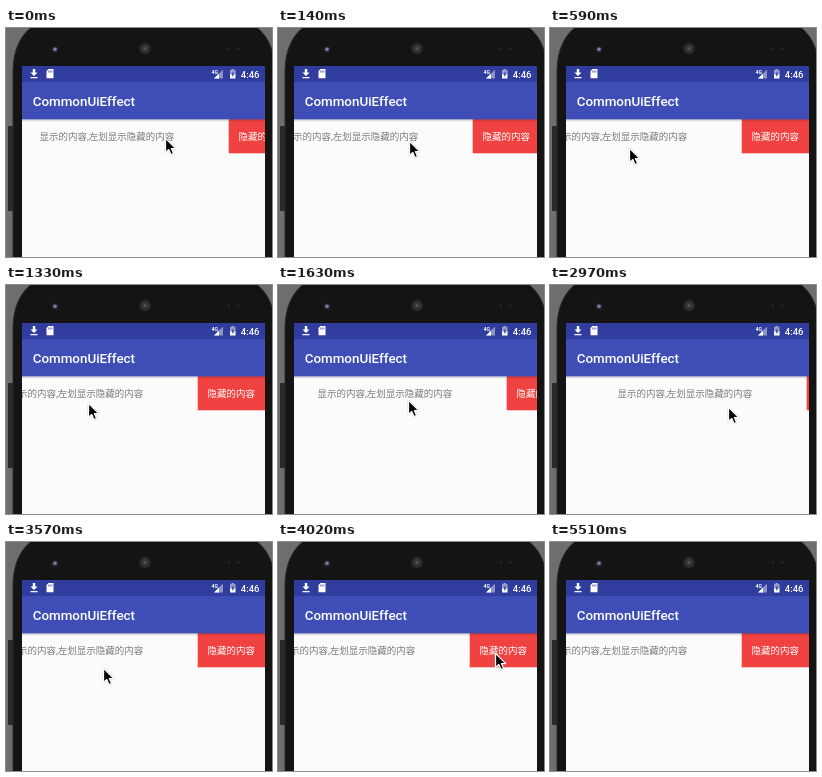
Write an HTML page that moves like this. It is 266 px wide and 229 px high and loops after 6490 ms.

```html
<!DOCTYPE html>
<html lang="zh-CN">
<head>
<meta charset="utf-8">
<title>Swipe row</title>
<style>
html, body { margin: 0; width: 100%; height: 100%; overflow: hidden; background: #6e6e6e; }
svg { display: block; width: 266px; height: 229px; }
text { font-family: Roboto, "Noto Sans CJK SC", "Noto Sans CJK", sans-serif; }
.label { font-size: 9.5px; }
</style>
</head>
<body>
<svg viewBox="0 0 266 229">
  <defs>
    <clipPath id="screen"><rect x="16" y="38" width="243" height="191"/></clipPath>
    <linearGradient id="shade" x2="0" y2="1">
      <stop stop-color="#000" stop-opacity=".2"/>
      <stop offset="1" stop-color="#000" stop-opacity="0"/>
    </linearGradient>
  </defs>

  <!-- phone -->
  <rect width="266" height="229" fill="#6e6e6e"/>
  <rect x="2" y="98" width="6" height="85" rx="1" fill="#292929"/>
  <path d="M7 232V43C7 22 15 5 29 -3H247C261 5 269 22 269 43V232Z" fill="#141414" stroke="#2a2a2a"/>
  <circle cx="49" cy="21.5" r="3.3" fill="#25262b"/>
  <circle cx="49" cy="21.2" r="1.8" fill="#7d80a4"/>
  <circle cx="139" cy="20.5" r="5.8" fill="#2a2a2a"/>
  <circle cx="139" cy="20.5" r="3.4" fill="#383838"/>
  <circle cx="139" cy="20.5" r="1.3" fill="#555"/>
  <circle cx="223" cy="20.5" r="1.5" fill="#222"/>
  <circle cx="232" cy="20.5" r="1.5" fill="#222"/>

  <g clip-path="url(#screen)">
    <rect x="16" y="38" width="243" height="191" fill="#fbfbfb"/>
    <g id="row">
      <text class="label" x="70.5" y="112.3" fill="#7a7a7a">显示的内容,左划显示隐藏的内容</text>
      <rect x="259.7" y="91" width="69" height="34.3" fill="#f04240"/>
      <text class="label" x="269.5" y="112.3" fill="#fff">隐藏的内容</text>
    </g>
    <rect x="16" y="91.4" width="243" height="2.6" fill="url(#shade)"/>

    <!-- bars -->
    <rect x="16" y="38" width="243" height="16" fill="#303c9e"/>
    <rect x="16" y="54" width="243" height="37.4" fill="#3e4eb6"/>
    <text x="26.7" y="78" font-size="13.4" font-weight="500" fill="#fff">CommonUiEffect</text>
    <g fill="#fff">
      <path d="M26.8 41H29.2V44.5H31.5L28 48L24.5 44.5H26.8ZM24.5 49H31.5V50.2H24.5Z"/>
      <path d="M42.5 41H47.5V50.2H40.5V43Z"/>
      <path d="M42.7 42.5V44.5M44.3 42.5V44.5M45.9 42.5V44.5" stroke="#303c9e" stroke-width=".7"/>
      <text x="205.5" y="45.5" font-size="5.2" font-weight="700">4G</text>
      <path d="M217 41.5V50.5H208Z" opacity=".45"/>
      <path d="M213 45.5V50.5H208Z"/>
      <path d="M225.5 41H228V42H229.5V46H224V42H225.5Z" opacity=".5"/>
      <path d="M224 46H229.5V50.5H224Z"/>
      <path d="M227.2 43.2L225.2 46.8H226.5V49.3L228.5 45.7H227.2Z" fill="#303c9e"/>
      <text x="234.8" y="49.5" font-size="9.5" font-weight="500">4:46</text>
    </g>
  </g>

  <path id="cursor" d="M1.5 .4V14.6L4.8 11.6L7 16.7L9.6 15.6L7.4 10.6H11.8Z"
    fill="#000" stroke="#fff" stroke-width="1.3" stroke-linejoin="round"
    style="filter:drop-shadow(0 .7px .7px #0007)"/>
</svg>
<script>
const LOOP = 6490, FIRST = 137, TICK = 149, GONE = 37;
const OPEN = -68, CLOSED = 0;

// Each gesture ends at x, y; lead speeds up its start, arc lifts its middle.
// The row follows the pointer once it has moved past slop.
const gestures = [
  { from: 0, to: 4, x: 78, y: 120, lead: 4.8, arc: 0, slop: 0 },
  { from: 8, to: 14, x: 204, y: 120, lead: 0.67, arc: 5, slop: 14 },
  { from: 19, to: 23, x: 78, y: 128, lead: 2.5, arc: 0, slop: 24 },
  { from: 23, to: 27, x: 216, y: 111, lead: 1.35, arc: 0, slop: Infinity },
  { from: 35, to: 36, x: 229, y: 170, lead: 1, arc: 0, slop: Infinity }
];

const row = document.getElementById("row");
const cursor = document.getElementById("cursor");
const clamp = (v, low, high) => Math.min(high, Math.max(low, v));
const moveTo = (el, x, y) => el.setAttribute("transform", `translate(${x} ${y})`);

function ease(u, lead) {
  const gone = lead * u * u, left = (1 - u) ** 2;
  return gone / (gone + left);
}

function poseAt(tick) {
  let x = 158, y = 110, offset = -37;
  for (const g of gestures) {
    const u = clamp((tick - g.from) / (g.to - g.from), 0, 1);
    const p = ease(u, g.lead);
    const dx = (g.x - x) * p;
    const drag = Math.sign(dx) * Math.max(0, Math.abs(dx) - g.slop);
    offset = clamp(offset + drag, OPEN, CLOSED);
    x += dx;
    y += (g.y - y) * p - g.arc * Math.sin(Math.PI * u);
  }
  return { x: Math.round(x), y: Math.round(y), offset: Math.round(offset) };
}

function draw(time) {
  const tick = Math.max(0, Math.floor((time % LOOP - FIRST) / TICK) + 1);
  const { x, y, offset } = poseAt(tick);
  moveTo(row, offset, 0);
  moveTo(cursor, x, y);
  cursor.setAttribute("visibility", tick < GONE ? "visible" : "hidden");
}

let start;
function frame(now) {
  start ??= now;
  draw(now - start);
  requestAnimationFrame(frame);
}
draw(0);
requestAnimationFrame(frame);
</script>
</body>
</html>
```
